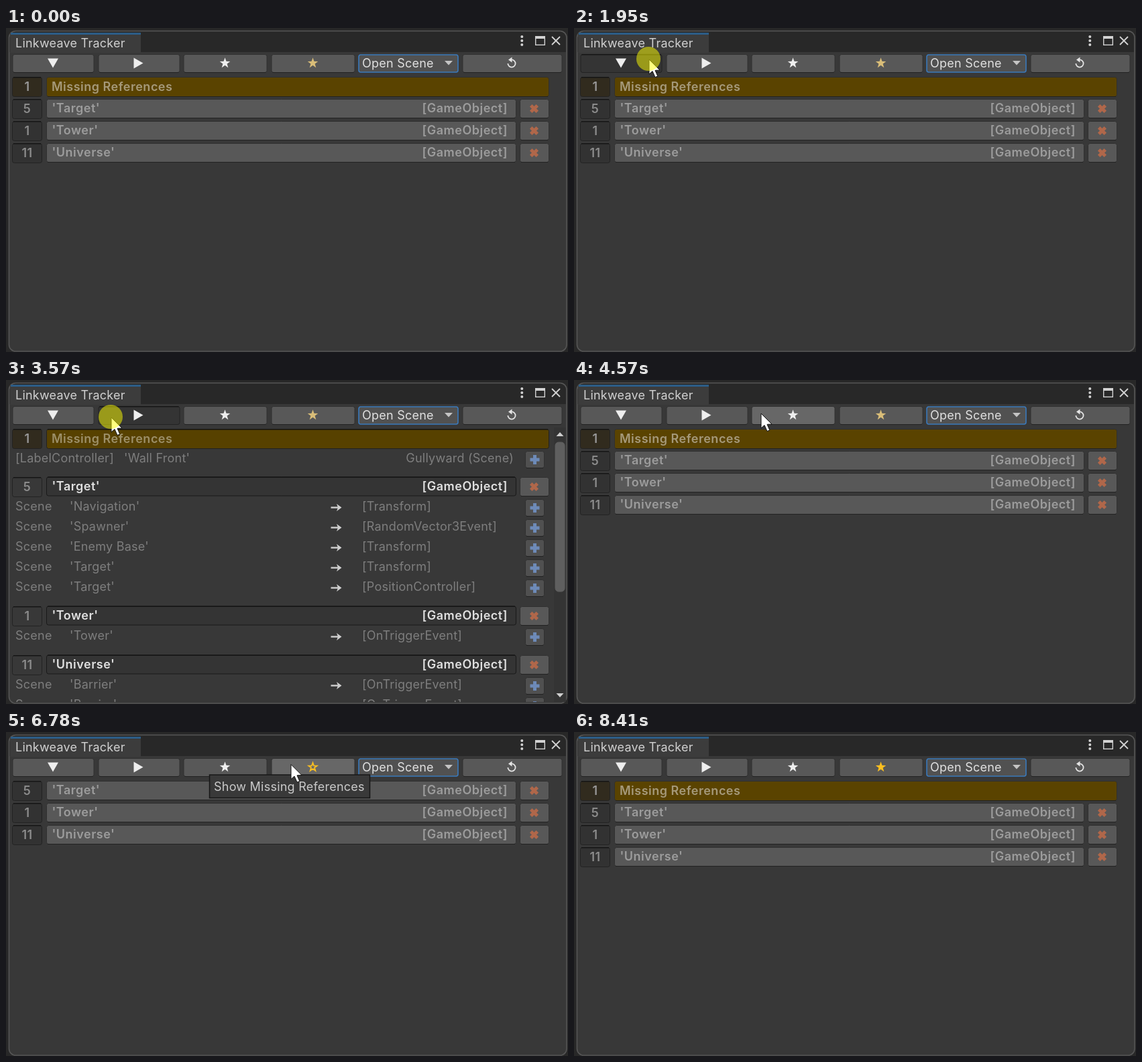
These frames come from a looping animation (838 by 484 pixels, 8750 ms). An HTML page with a canvas:

```html
<!DOCTYPE html>
<html lang="en">
<head>
<meta charset="utf-8">
<title>Linkweave Tracker</title>
<style>
  html, body { margin: 0; width: 100%; height: 100%; overflow: hidden; background: #282828; }
  canvas { display: block; }
</style>
</head>
<body>
<canvas width="838" height="484"></canvas>
<script>
const ctx = document.querySelector('canvas').getContext('2d');
const LOOP = 8750;

// Cursor moves: start, end, then start point, control point and end point
const MOVES = [
  [480, 1610, [850, 104], [300, 105], [112, 47]],
  [2480, 3010, [112, 47], [122, 92], [157, 56]],
  [4100, 4570, [157, 56], [215, 74], [279, 50]],
  [6040, 6250, [279, 50], [350, 52], [425, 48.5]],
  [7650, 8410, [425, 48.5], [600, 48], [850, 104]]
];
// Clicks: press, release, button index
const CLICKS = [
  [1950, 2080, 0], [3570, 3700, 1], [5100, 5240, 2],
  [5700, 5830, 2], [6650, 6780, 3], [7310, 7450, 3]
];
const BUTTONS = [[10, 121], [138, 121], [265, 124], [396, 124], [526, 148], [681, 148]];
const GROUPS = [
  { name: "'Target'", count: 5, items: [
    ["'Navigation'", '[Transform]'], ["'Spawner'", '[RandomVector3Event]'],
    ["'Enemy Base'", '[Transform]'], ["'Target'", '[Transform]'],
    ["'Target'", '[PositionController]']] },
  { name: "'Tower'", count: 1, items: [["'Tower'", '[OnTriggerEvent]']] },
  { name: "'Universe'", count: 11, items: [
    ["'Barrier'", '[OnTriggerEvent]'], ["'Barrier'", '[OnTriggerEvent]']] }
];

const within = (t, a, b) => t >= a && t < b;

function text(str, x, y, color, bold = false, align = 'left') {
  ctx.font = `${bold ? 600 : 400} 18px Inter, sans-serif`;
  ctx.letterSpacing = bold ? '0.5px' : '0.23px';
  ctx.textAlign = align;
  ctx.fillStyle = color;
  ctx.fillText(str, x, y);
}

function box(x, y, w, h, fill, edge = '#2c2c2c', radius = 3, line = 1) {
  ctx.beginPath();
  ctx.roundRect(x, y, w, h, radius);
  ctx.fillStyle = fill;
  ctx.fill();
  ctx.strokeStyle = edge;
  ctx.lineWidth = line;
  ctx.stroke();
}

function raised(x, y, w, h, fill = '#585858') {
  box(x + .5, y + .5, w - 1, h - 1, fill, '#303030');
  ctx.fillStyle = '#222';
  ctx.fillRect(x + 2, y + h - 1, w - 4, 1);
}

function sunken(x, y, w, h, fill, edge = '#222') {
  box(x + .5, y + .5, w - 1, h - 1, fill, edge);
  ctx.fillStyle = '#151515';
  ctx.fillRect(x + 2, y, w - 4, 1.5);
}

function polygon(points, fill) {
  ctx.beginPath();
  points.forEach(([x, y]) => ctx.lineTo(x, y));
  ctx.closePath();
  if (fill) {
    ctx.fillStyle = fill;
    ctx.fill();
  }
}

function line(points, color, width) {
  ctx.beginPath();
  points.forEach(([x, y], i) => i % 2 ? ctx.lineTo(x, y) : ctx.moveTo(x, y));
  ctx.strokeStyle = color;
  ctx.lineWidth = width;
  ctx.stroke();
}

function star(x, y, color, hollow) {
  const points = Array.from({ length: 10 }, (_, i) => {
    const r = (i % 2 ? .4 : 1) * (hollow ? 6.5 : 8.2), a = (i * 36 - 90) * Math.PI / 180;
    return [x + r * Math.cos(a), y + r * Math.sin(a)];
  });
  polygon(points, hollow ? null : color);
  if (hollow) {
    ctx.strokeStyle = color;
    ctx.lineWidth = 1.8;
    ctx.stroke();
  }
}

function reloadIcon(x, y) {
  ctx.beginPath();
  ctx.arc(x, y, 5.6, -Math.PI / 2, Math.PI);
  ctx.strokeStyle = '#e4e4e4';
  ctx.lineWidth = 1.8;
  ctx.stroke();
  polygon([[x - 5, y - 5.5], [x + .5, y - 9.5], [x + .5, y - 1.5]], '#e4e4e4');
}

function deleteButton(y) {
  raised(766, y, 44, 29);
  const cy = y + 14.5;
  line([[782.7, cy - 4.8], [792.3, cy + 4.8], [792.3, cy - 4.8], [782.7, cy + 4.8]], '#b0674a', 5);
}

function addButton(y) {
  raised(774, y, 29, 26, '#505050');
  line([[781.5, y + 13], [795.5, y + 13], [788.5, y + 6], [788.5, y + 20]], '#6d8ab8', 5);
}

function windowFrame() {
  ctx.fillStyle = '#282828';
  ctx.fillRect(0, 0, 838, 484);
  box(4.5, 4.5, 831.5, 478.5, '#383838', '#565656', 10, 1.6);
  ctx.fillStyle = '#282828';
  ctx.beginPath();
  ctx.roundRect(5.5, 5.5, 829.5, 30.5, [9, 9, 0, 0]);
  ctx.fill();
  ctx.fillStyle = '#3c3c3c';
  ctx.fillRect(6, 8, 195, 29);
  ctx.fillStyle = '#2c5d87';
  ctx.fillRect(7, 7, 194, 3);
  text('Linkweave Tracker', 14, 29, '#d0d0d0');

  ctx.fillStyle = '#d2d2d2';
  for (const y of [13, 19, 25]) {
    ctx.beginPath();
    ctx.arc(769.3, y, 2, 0, 7);
    ctx.fill();
  }
  ctx.fillRect(789, 12, 15, 4);
  ctx.strokeStyle = '#d2d2d2';
  ctx.lineWidth = 1.4;
  ctx.strokeRect(789.7, 12.7, 13.6, 12.6);
  line([[814, 13], [826, 25], [826, 13], [814, 25]], '#d2d2d2', 1.8);
}

function toolbar(pressed, hovered, hideRefs, hideMissing, brightStar) {
  BUTTONS.forEach(([x, w], i) => {
    if (i === 4) box(x, 40, w, 26, '#515151', '#3a79bb', 3, 1.6);
    else if (i === pressed) sunken(x - .5, 39, w + 1, 28, '#343434');
    else raised(x - .5, 39, w + 1, 28, i === hovered ? '#676767' : '#585858');
  });
  polygon([[62, 45.5], [78, 45.5], [70, 59.5]], '#eee');
  polygon([[190.5, 44.5], [204.5, 52.5], [190.5, 60.5]], '#eee');
  star(326.5, 52.5, '#eee', hideRefs);
  star(457.5, 52.5, brightStar ? '#fcbf20' : '#d9bd78', hideMissing);
  text('Open Scene', 531, 59, '#e0e0e0');
  polygon([[654, 49], [666, 49], [660, 55.5]], '#c4c4c4');
  reloadIcon(754, 53);
}

function missingRow(y, open) {
  const row = open ? sunken : raised;
  sunken(9, y, 45, 30, '#312b1e');
  text('1', 31.5, y + 21, '#989898', true, 'center');
  row(60, y, 750, 30, open ? '#574100' : '#5a4300');
  text('Missing References', 68, y + 21, open ? '#9c8f68' : '#a5997a', true);
}

function groupRow(y, group, open) {
  sunken(9, y, 45, 30, open ? '#383838' : '#323232');
  text(group.count, 31.5, y + 21, '#8c8c8c', true, 'center');
  if (open) sunken(60, y - .5, 701, 29, '#343434', '#191919');
  else raised(60, y, 701, 29);
  const color = open ? '#e0e0e0' : '#9c9c9c';
  text(group.name, 68.5, y + 20, color, true);
  text('[GameObject]', 620.5, y + 20, color, true);
  deleteButton(y);
}

function itemRow(y, [name, type]) {
  text('Scene', 14, y, '#7e7e7e');
  text(name, 95, y, '#7e7e7e');
  text(type, 531, y, '#7e7e7e');
  line([[484.5, y - 4.5], [496, y - 4.5]], '#cfcfcf', 2.4);
  polygon([[493, y - 10], [500.5, y - 4.5], [493, y + 1], [495, y - 4.5]], '#cfcfcf');
  addButton(y - 17);
}

function collapsedList(hideRefs, hideMissing) {
  let y = 73;
  if (!hideMissing) {
    missingRow(y);
    y += 33;
  }
  if (!hideRefs) GROUPS.forEach((group, i) => groupRow(y + i * 33, group, false));
}

function expandedList() {
  ctx.save();
  ctx.beginPath();
  ctx.rect(6, 70, 829, 411);
  ctx.clip();
  missingRow(73, true);
  text('[LabelController]', 14, 123, '#7e7e7e');
  text("'Wall Front'", 176, 123, '#7e7e7e');
  text('Gullyward (Scene)', 757, 123, '#7e7e7e', false, 'right');
  addButton(106);
  let y = 145;
  for (const group of GROUPS) {
    groupRow(y, group, true);
    group.items.forEach((item, i) => itemRow(y + 50 + i * 30, item));
    y = Math.round(y + 43.4 + group.items.length * 30);
  }
  ctx.fillStyle = '#343434';
  ctx.fillRect(817, 71, 18, 411);
  polygon([[820.5, 84], [831.5, 84], [826, 78]], '#cfcfcf');
  polygon([[820.5, 468], [831.5, 468], [826, 474]], '#cfcfcf');
  box(819, 93, 14, 223, '#5f5f5f', '#5f5f5f', 5);
  ctx.restore();
}

function cursorAt(t) {
  const [start, end, a, c, b] = MOVES.findLast(m => t >= m[0]) || MOVES[0];
  const p = Math.min(1, Math.max(0, (t - start) / (end - start)));
  const s = p * p * (3 - 2 * p);
  return a.map((v, i) => (1 - s) ** 2 * v + 2 * s * (1 - s) * c[i] + s * s * b[i]);
}

function drawCursor(x, y) {
  const arrow = [[0, 0], [0, 22], [5, 17.5], [9, 26.5], [12.8, 25], [9, 16.3], [16, 16]];
  polygon(arrow.map(([dx, dy]) => [x + dx, y + dy]), '#fff');
  ctx.strokeStyle = '#111';
  ctx.lineWidth = 1;
  ctx.stroke();
}

function draw(t) {
  const click = CLICKS.find(([a, b]) => within(t, a, b));
  const showCursor = within(t, 660, 8400);
  const [x, y] = cursorAt(t);
  const hovered = showCursor && y > 39 && y < 67
    ? BUTTONS.findIndex(([left, w]) => x >= left && x < left + w) : -1;
  const hideRefs = within(t, 5240, 5830);
  const hideMissing = within(t, 6780, 7450);

  windowFrame();
  toolbar(click ? click[2] : -1, hovered, hideRefs, hideMissing, t >= 6180);
  if (within(t, 2080, 3700)) expandedList();
  else collapsedList(hideRefs, hideMissing);

  if (within(t, 6780, 7310)) {
    box(303.5, 64, 239, 34.5, '#393939', '#171717', 0, 1.5);
    text('Show Missing References', 310, 88, '#cacaca');
  }
  if (showCursor) drawCursor(x, y);
  if (click) {
    ctx.beginPath();
    ctx.arc(x - 1, y - 1, 18, 0, 7);
    ctx.fillStyle = 'rgba(255, 255, 0, .5)';
    ctx.fill();
  }
}

function tick() {
  draw(performance.now() % LOOP);
  requestAnimationFrame(tick);
}
tick();
</script>
</body>
</html>
```
